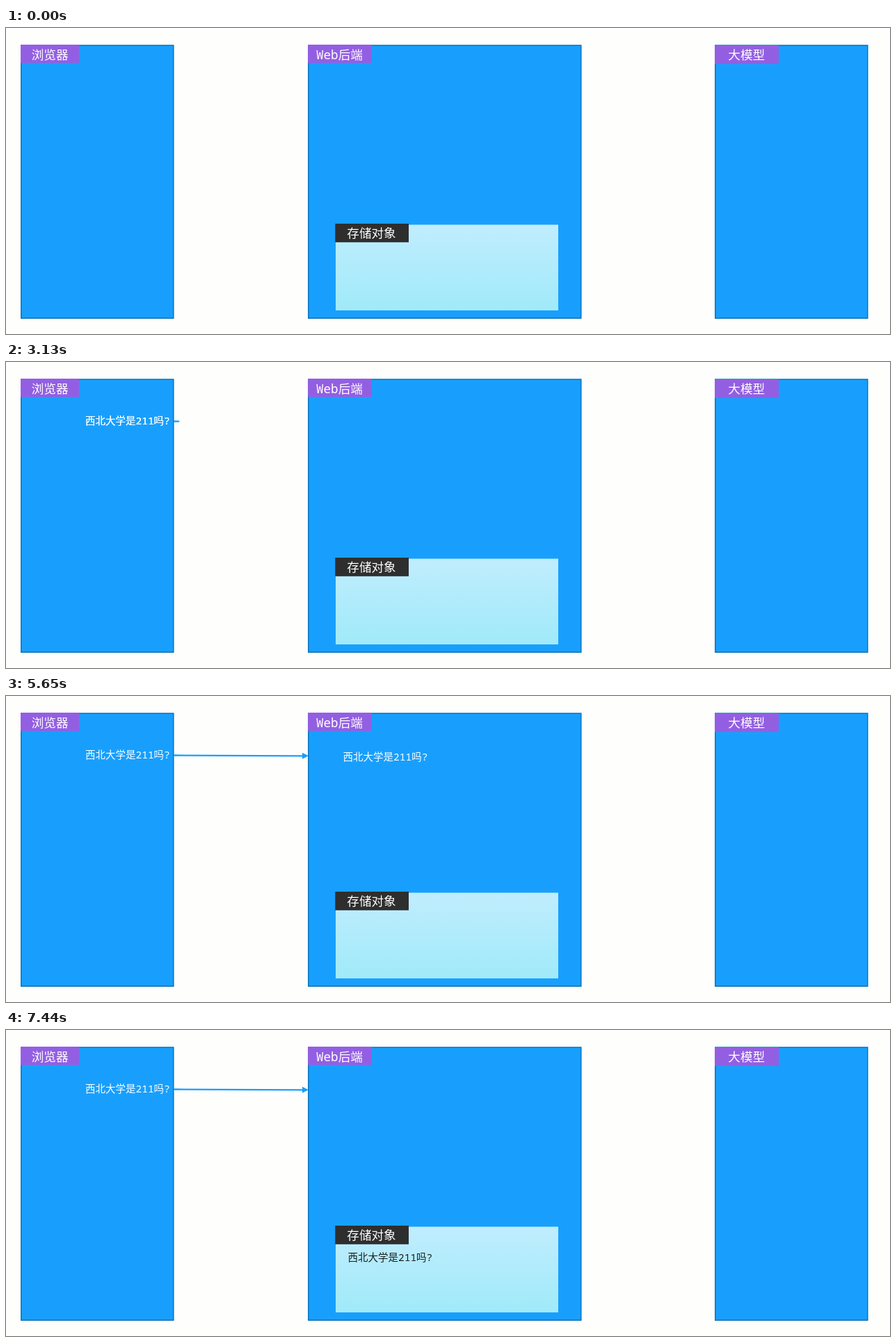
Animation of 1271 by 441 pixels, one loop 8000 ms. Source, as an HTML page:

```html
<!DOCTYPE html>
<html lang="zh-CN">
<head>
<meta charset="utf-8">
<style>
  html, body { margin: 0; width: 100%; height: 100%; overflow: hidden; background: #fefefd; }
  svg { display: block; width: 100%; height: 100%; }
  text { font: 17.6px "Noto Sans Mono", "Noto Sans CJK SC", "Noto Sans CJK", monospace; fill: #fff; white-space: pre; }
  .message { font-size: 14.5px; }
  .panel { fill: #189ffd; stroke: #0a73b8; stroke-width: 1.5; }
  .tag { fill: #935fe2; }
</style>
</head>
<body>
<svg viewBox="0 0 1271 441">
  <defs>
    <linearGradient id="ice" x2="0" y2="1">
      <stop stop-color="#c0edfe"/>
      <stop offset="1" stop-color="#a0eaf9"/>
    </linearGradient>
    <clipPath id="wipe"><rect id="wipeBox" x="241" y="75" width="0" height="22"/></clipPath>
  </defs>

  <rect class="panel" x="21.8" y="25" width="219" height="393.3"/>
  <rect class="tag" x="21" y="24" width="84" height="26.5"/>
  <text x="36.7" y="44.5">浏览器</text>

  <rect class="panel" x="434.8" y="25" width="392" height="393.3"/>
  <rect class="tag" x="434" y="24" width="92" height="26.5"/>
  <text x="446" y="44.5">Web后端</text>

  <rect class="panel" x="1019.8" y="25" width="219" height="393.3"/>
  <rect class="tag" x="1019" y="25" width="92" height="27"/>
  <text x="1038.3" y="45">大模型</text>

  <rect x="474" y="283.5" width="320" height="123.5" fill="url(#ice)"/>
  <rect x="473.3" y="282" width="105.7" height="26.8" fill="#2e2e2e"/>
  <text x="490.3" y="302">存储对象</text>

  <g clip-path="url(#wipe)" fill="#189ffd">
    <path d="M241 85.5L428 86.3" stroke="#189ffd" stroke-width="2.3"/>
    <path d="M426 81.8L435 86.3L426 90.8Z"/>
  </g>

  <text class="message" id="question">西北大学是211吗?</text>
  <text class="message" id="copy">西北大学是211吗?</text>
</svg>
<script>
  const LOOP = 8000, BASE_Y = 90.3;
  const [question, copy, wipeBox] = ['question', 'copy', 'wipeBox'].map(id => document.getElementById(id));

  const progress = (t, start, length) => Math.min(1, Math.max(0, (t - start) / length));
  const smooth = p => p * p * p * (p * (6 * p - 15) + 10);
  const place = (el, x, y, opacity) => {
    el.setAttribute('x', x);
    el.setAttribute('y', y);
    el.style.opacity = opacity;
  };

  function draw(now) {
    const t = now % LOOP;
    const rise = progress(t, 1000, 1000);
    const send = smooth(progress(t, 3155, 1960));
    const store = smooth(progress(t, 5425, 1960));
    const stored = t >= 7435;

    place(question, 114, BASE_Y + 73 * (1 - rise), rise);
    wipeBox.setAttribute('width', 195 * progress(t, 3110, 500));

    const x = stored ? 491.5 : 114 + 370.5 * send + 4 * store;
    place(copy, x, BASE_Y + 243 * store, t >= 3130 ? 1 : 0);
    copy.style.fill = stored ? '#1c1c1c' : '#fff';

    requestAnimationFrame(draw);
  }
  requestAnimationFrame(draw);
</script>
</body>
</html>
```
